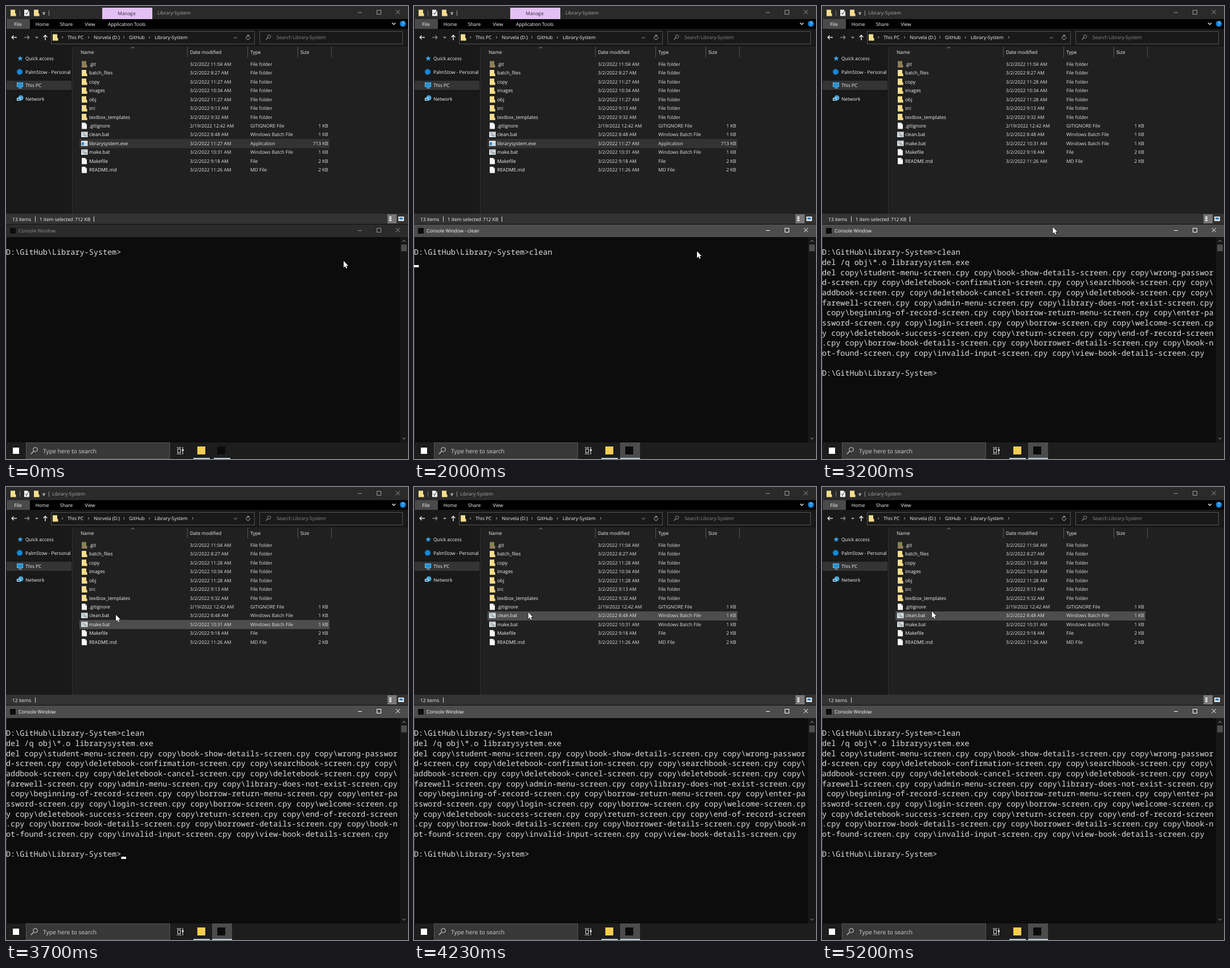
Write an HTML page with a canvas that moves like this. It is 706 px wide and 794 px high and loops after 5.23 s.

```html
<!DOCTYPE html>
<html lang="en">
<head>
<meta charset="utf-8">
<title>Clean build</title>
<style>
html, body { margin: 0; width: 100%; height: 100%; overflow: hidden; background: #191919; }
canvas { display: block; width: 706px; height: 794px; }
</style>
</head>
<body>
<canvas id="stage" width="706" height="794"></canvas>
<script>
const ctx = document.getElementById('stage').getContext('2d');
const LOOP = 5230;
const UI = '"Open Sans", "Noto Sans", sans-serif';
const MONO = '"Noto Sans Mono", "DejaVu Sans Mono", monospace';
const CELL = 8.094, LINE = 17.65, FIRST = 432, COLS = 85;
const ROW = 15.43, FIRST_ROW = 102;

const T = { focus: 400, enter: 1990, del: 2060, list: 2150, done: 2265, refresh: 2800, status: 3320 };
const TYPED_AT = [960, 1060, 1170, 1270, 1395];
const CARET_ON = [[400, 930], [1465, 2060], [2265, 2770], [3570, 4100], [4630, 5160]];
const PATH = [
  [0, 593, 447], [30, 593, 447], [130, 497, 430], [2770, 497, 430], [3000, 455, 410],
  [3200, 406, 388], [3400, 285, 300], [3600, 202, 238], [3700, 193, 224], [3850, 194, 220],
  [4000, 198, 217], [4250, 201, 220], [4500, 203, 222], [4850, 198, 219], [5200, 193, 218], [5230, 193, 218]
];

const PROMPT = 'D:\\GitHub\\Library-System>';
const SCREENS = ('student-menu book-show-details wrong-password deletebook-confirmation searchbook addbook ' +
  'deletebook-cancel deletebook farewell admin-menu library-does-not-exist beginning-of-record ' +
  'borrow-return-menu enter-password login borrow welcome deletebook-success return end-of-record ' +
  'borrow-book-details borrower-details book-not-found invalid-input view-book-details').split(' ');
const DEL_LINES = ('del ' + SCREENS.map(s => `copy\\${s}-screen.cpy`).join(' '))
  .match(new RegExp(`.{1,${COLS}}`, 'g'));

const FILES = [
  ['.git', '3/2/2022 11:04 AM', 'File folder'],
  ['batch_files', '3/2/2022 8:27 AM', 'File folder'],
  ['copy', '3/2/2022 11:27 AM', 'File folder'],
  ['images', '3/2/2022 10:34 AM', 'File folder'],
  ['obj', '3/2/2022 11:27 AM', 'File folder'],
  ['src', '3/2/2022 9:13 AM', 'File folder'],
  ['textbox_templates', '3/2/2022 9:32 AM', 'File folder'],
  ['.gitignore', '2/19/2022 12:42 AM', 'GITIGNORE File', '1 KB'],
  ['clean.bat', '3/2/2022 8:48 AM', 'Windows Batch File', '1 KB'],
  ['librarysystem.exe', '3/2/2022 11:27 AM', 'Application', '713 KB'],
  ['make.bat', '3/2/2022 10:31 AM', 'Windows Batch File', '1 KB'],
  ['Makefile', '3/2/2022 9:18 AM', 'File', '2 KB'],
  ['README.md', '3/2/2022 11:26 AM', 'MD File', '2 KB']
];
const FILES_AFTER = FILES.filter(f => f[0] !== 'librarysystem.exe')
  .map(f => f[0] === 'copy' || f[0] === 'obj' ? [f[0], '3/2/2022 11:28 AM', f[2]] : f);

function box(x, y, w, h, color) {
  ctx.fillStyle = color;
  ctx.fillRect(x, y, w, h);
}
function frame(x, y, w, h, color) {
  ctx.strokeStyle = color;
  ctx.lineWidth = 1;
  ctx.strokeRect(x + 0.5, y + 0.5, w - 1, h - 1);
}
function line(points, color, width = 1) {
  ctx.beginPath();
  points.forEach(([x, y]) => ctx.lineTo(x, y));
  ctx.strokeStyle = color;
  ctx.lineWidth = width;
  ctx.stroke();
}
function poly(points, color) {
  ctx.beginPath();
  points.forEach(([x, y]) => ctx.lineTo(x, y));
  ctx.closePath();
  ctx.fillStyle = color;
  ctx.fill();
}
function disc(x, y, r, color) {
  ctx.beginPath();
  ctx.arc(x, y, r, 0, 7);
  ctx.fillStyle = color;
  ctx.fill();
}
function ring(x, y, r, color, from = 0, to = 7) {
  ctx.beginPath();
  ctx.arc(x, y, r, from, to);
  ctx.strokeStyle = color;
  ctx.lineWidth = 1;
  ctx.stroke();
}
// y is the middle of the text line
function label(text, x, y, color = '#f4f4f4', size = 8.4, align = 'left') {
  ctx.font = `${size}px ${UI}`;
  ctx.textAlign = align;
  ctx.fillStyle = color;
  ctx.fillText(text, x, y + size * 0.36);
}
function gray(from, to, k) {
  const v = Math.round(from + (to - from) * k);
  return `rgb(${v},${v},${v})`;
}
// dx, dy give the direction the tip points to
function chevron(x, y, r, dx, dy, color, width = 1) {
  line([[x - dx * r / 2 - dy * r, y - dy * r / 2 - dx * r], [x + dx * r / 2, y + dy * r / 2],
    [x - dx * r / 2 + dy * r, y - dy * r / 2 + dx * r]], color, width);
}
function arrow(x, y, dx, dy, color) {
  line([[x - dx * 4.5, y - dy * 4.5], [x + dx * 4.5, y + dy * 4.5]], color, 1.3);
  chevron(x + dx * 2.7, y + dy * 2.7, 3.3, dx, dy, color, 1.3);
}
function magnifier(x, y, r, color) {
  ring(x, y, r, color);
  line([[x - r * 0.7, y + r * 0.7], [x - r * 2, y + r * 2]], color, 1.2);
}

function folder(x, y, dim) {
  ctx.globalAlpha = dim ? 0.5 : 1;
  poly([[x, y - 5.5], [x + 8, y - 5.5], [x + 8, y + 0.5], [x + 9.5, y + 1.5], [x + 9.5, y + 5.5], [x, y + 5.5]], '#f7de8d');
  box(x, y + 4.5, 9.5, 1, '#efcd6d');
  ctx.globalAlpha = 1;
}
function page(x, y) {
  poly([[x, y - 5.5], [x + 6, y - 5.5], [x + 9, y - 2.5], [x + 9, y + 5.5], [x, y + 5.5]], '#f4f4f4');
  poly([[x + 6, y - 5.5], [x + 9, y - 2.5], [x + 6, y - 2.5]], '#b9b9b9');
}
function batch(x, y) {
  box(x, y - 5, 11.5, 9.5, '#dfe4e6');
  box(x, y - 5, 11.5, 1.5, '#aab3b8');
  ring(x + 4.5, y - 0.5, 1.8, '#7d888e');
  ring(x + 7.8, y + 1.7, 1.4, '#7d888e');
}
function program(x, y) {
  box(x, y - 4.5, 11.5, 9, '#e8eef2');
  box(x + 1, y - 2, 4, 5, '#2c7fc0');
  box(x + 6, y - 2, 4.5, 5, '#c0d4e2');
}
function fileIcon(file, y) {
  if (file[2] === 'File folder') folder(133, y, file[0] === '.git');
  else if (file[0].endsWith('.bat')) batch(132, y);
  else if (file[0].endsWith('.exe')) program(132, y);
  else page(133, y);
}
function windowButtons(y, color) {
  line([[618, y + 0.5], [625, y + 0.5]], color);
  frame(651, y - 4, 8, 8, color);
  line([[684.5, y - 4], [692, y + 3.5]], color);
  line([[692, y - 4], [684.5, y + 3.5]], color);
}

function ribbon(refreshed) {
  box(0, 0, 706, 23, '#2a2a2a');
  folder(8, 12);
  box(24, 8, 1, 9, '#7b7b7b');
  page(32, 12);
  line([[34, 12], [36, 14.5], [39.5, 9.5]], '#555', 1.2);
  folder(49, 12);
  line([[64, 11.5], [69, 11.5]], '#ddd');
  poly([[64.2, 13], [68.8, 13], [66.5, 15.5]], '#ddd');
  box(75, 8, 1, 9, '#9b9b9b');
  if (!refreshed) {
    box(169, 3, 88, 20, '#e2c0f2');
    label('Manage', 212, 13, '#3a2a40', 8.4, 'center');
  }
  label('Library-System', refreshed ? 81 : 266, 12, '#a8a8a8');
  windowButtons(11, '#9a9a9a');

  box(0, 23, 706, 17, '#000');
  box(1, 23, 41, 17, '#4a4a4a');
  label('File', 21, 31.5, '#fff', 8.4, 'center');
  label('Home', 63.5, 31.5, '#fff', 8.4, 'center');
  label('Share', 106, 31.5, '#fff', 8.4, 'center');
  label('View', 147.5, 31.5, '#fff', 8.4, 'center');
  if (!refreshed) label('Application Tools', 212, 31.5, '#fff', 8.4, 'center');
  chevron(681, 31, 3, 0, 1, '#ddd', 1.5);
  disc(697, 31, 5.3, '#1583d7');
  label('?', 697, 31, '#fff', 8.5, 'center');
}

function addressBar(refreshed) {
  box(0, 40, 706, 31, '#191919');
  arrow(14.5, 55, -1, 0, '#fff');
  arrow(36.5, 55, 1, 0, '#8f8f8f');
  chevron(54, 55, 2, 0, 1, '#ccc', 1.2);
  arrow(69, 55.5, 0, -1, '#fff');
  frame(79, 44, 358, 23, '#535353');
  folder(82, 55);
  const crumbs = [['This PC', 108], ['Norvela (D:)', 154], ['GitHub', 216], ['Library-System', 261]];
  crumbs.forEach(([name, x]) => {
    chevron(x - 9, 55, 2, 1, 0, '#aaa');
    label(name, x, 55);
  });
  if (refreshed) chevron(328, 55, 2, 1, 0, '#aaa');
  chevron(403, 55.5, 2.7, 0, 1, '#aaa');
  ring(425, 55.5, 3.2, '#aaa', -0.4, 4.9);
  poly([[424, 50], [428, 52], [424.5, 54]], '#aaa');
  frame(445, 44, 252, 23, '#535353');
  magnifier(462, 53.5, 2.8, '#8d8d8d');
  label('Search Library-System', 475, 55, '#8d8d8d');
}

function navPane() {
  box(0, 71, 117, 293, '#191919');
  box(1, 131, 114, 16, '#343434');
  const star = [];
  for (let i = 0; i < 10; i++) {
    const a = i * Math.PI / 5 - Math.PI / 2, r = i % 2 ? 2.2 : 5;
    star.push([25 + r * Math.cos(a), 92 + r * Math.sin(a)]);
  }
  poly(star, '#37a3ea');
  disc(24, 115.5, 5, '#1187d8');
  box(19, 134, 11, 8, '#5bc0ef');
  box(20, 135, 9, 6, '#2391d6');
  box(22, 143, 6, 1.2, '#8ccdf0');
  disc(26, 161, 4.5, '#49a9de');
  box(19, 161, 6.5, 5, '#d3e8f3');
  box(20, 162, 4.5, 3, '#2d82bd');
  label('Quick access', 34, 92);
  label('PalmStow - Personal', 34, 115.5);
  label('This PC', 34, 139);
  label('Network', 34, 162.5);
}

function fileList(t, refreshed) {
  box(117, 71, 589, 293, '#202020');
  box(116, 71, 1, 293, '#303030');
  [318, 424, 512, 571].forEach(x => box(x, 71, 1, 19, '#555'));
  chevron(222.5, 73, 2.5, 0, -1, '#aaa');
  label('Name', 131, 81);
  label('Date modified', 323, 81);
  label('Type', 429, 81);
  label('Size', 517, 81);

  const hover = t < 3560 ? '' : t < 3720 ? 'make.bat' : 'clean.bat';
  const detail = '#e2e2e2';
  (refreshed ? FILES_AFTER : FILES).forEach((file, i) => {
    const y = FIRST_ROW + i * ROW;
    const top = Math.round(y - 7.5);
    if (file[0] === hover) box(129, top, 439, 16, '#4d4d4d');
    if (file[0] === 'librarysystem.exe') box(129, top, 439, 16, '#333');
    fileIcon(file, y);
    label(file[0], 146, y);
    label(file[1], 323, y, detail, 8.25);
    label(file[2], 429, y, detail);
    if (file[3]) label(file[3], 566, y, detail, 8.4, 'right');
  });
}

function statusBar(t) {
  box(0, 364, 706, 18, '#333');
  const old = t < T.status;
  label(old ? '13 items' : '12 items', 11, 373.5);
  box(51, 369, 1, 9, '#ddd');
  if (old) {
    label('1 item selected', 59, 373.5);
    label('712 KB', 121, 373.5);
    box(154, 369, 1, 9, '#ddd');
  }
  box(670, 365, 16, 16, '#777');
  for (let i = 0; i < 3; i++) box(673, 369 + i * 3, 4, 2, '#eee');
  box(689, 369, 10, 8, '#ddd');
  box(691, 371, 6, 3, '#277dbb');
}

function caretOn(t) {
  return CARET_ON.some(([a, b]) => t >= a && t < b);
}

function terminal(t, focus) {
  box(0, 382, 706, 1, '#111');
  box(0, 383, 706, 22, gray(43, 76, focus));
  box(7, 389, 10, 10, '#0b0b0b');
  const running = t >= T.enter && t < T.done;
  label('Console Window' + (running ? ' - clean' : ''), 22, 394, gray(145, 255, focus));
  windowButtons(393, gray(145, 255, focus));

  box(0, 405, 706, 360, '#0c0c0c');
  box(0, 405, 1, 360, '#393939');
  box(692, 405, 14, 360, '#171717');
  box(694, 418, 10, 12, '#4d4d4d');
  chevron(699, 412, 2.7, 0, -1, '#777', 1.2);
  chevron(699, 758, 2.7, 0, 1, '#777', 1.2);

  const typed = 'clean'.slice(0, TYPED_AT.filter(at => t >= at).length);
  const lines = [PROMPT + typed];
  if (t >= T.enter) lines.push('');
  if (t >= T.del) lines[1] = 'del /q obj\\*.o librarysystem.exe';
  if (t >= T.list) lines.push(...DEL_LINES);
  if (t >= T.done) lines.push('', PROMPT);

  ctx.font = `500 13.49px ${MONO}`;
  ctx.textAlign = 'left';
  ctx.fillStyle = '#dedede';
  lines.forEach((text, i) => ctx.fillText(text, 0, FIRST + i * LINE + 4.3));
  if (caretOn(t)) {
    const last = lines.length - 1;
    box(lines[last].length * CELL, Math.round(FIRST + last * LINE + 4), 8.5, 4, '#f2f2f2');
  }
}

function taskbar(focus) {
  box(0, 765, 706, 29, '#1d1d1e');
  box(12, 774, 11, 11, '#fff');
  box(35, 765, 253, 29, '#383838');
  frame(35, 765, 253, 29, '#555');
  magnifier(51.5, 777.5, 3.8, '#ddd');
  label('Type here to search', 65, 780, '#d2d2d2', 10.3);
  frame(301, 776, 6, 7, '#ddd');
  line([[300, 774], [308, 774]], '#ddd');
  line([[300, 785], [308, 785]], '#ddd');
  line([[310.5, 773], [310.5, 786]], '#ddd');
  box(309, 777, 3, 3, '#ddd');
  box(336, 772, 14, 14, '#f6cd55');
  box(362, 765, 35, 29, gray(29, 76, focus));
  box(371, 772, 14, 14, '#0b0b0b');
  box(329, 792, 29, 2, '#b9cbd8');
  box(365 - 3 * focus, 792, 29 + 6 * focus, 2, '#b9cbd8');
}

function pointer(t) {
  const i = PATH.findIndex(p => p[0] > t);
  const [t0, x0, y0] = PATH[i - 1], [t1, x1, y1] = PATH[i];
  const k = (t - t0) / (t1 - t0);
  const x = x0 + (x1 - x0) * k, y = y0 + (y1 - y0) * k;
  const shape = [[0, 0], [0, 11.5], [2.6, 9], [4.4, 13], [6.2, 12.2], [4.5, 8.3], [8, 8.2]]
    .map(([dx, dy]) => [x + dx, y + dy]);
  line([...shape, shape[0]], '#111', 1.4);
  poly(shape, '#fff');
}

function draw(t) {
  const refreshed = t >= T.refresh;
  const focus = Math.min(1, Math.max(0, (t - T.focus) / 100));
  ctx.textRendering = 'geometricPrecision';
  ribbon(refreshed);
  addressBar(refreshed);
  navPane();
  fileList(t, refreshed);
  statusBar(t);
  terminal(t, focus);
  taskbar(focus);
  pointer(t);
}

const start = performance.now();
function tick() {
  draw((performance.now() - start) % LOOP);
  requestAnimationFrame(tick);
}
tick();
</script>
</body>
</html>
```
